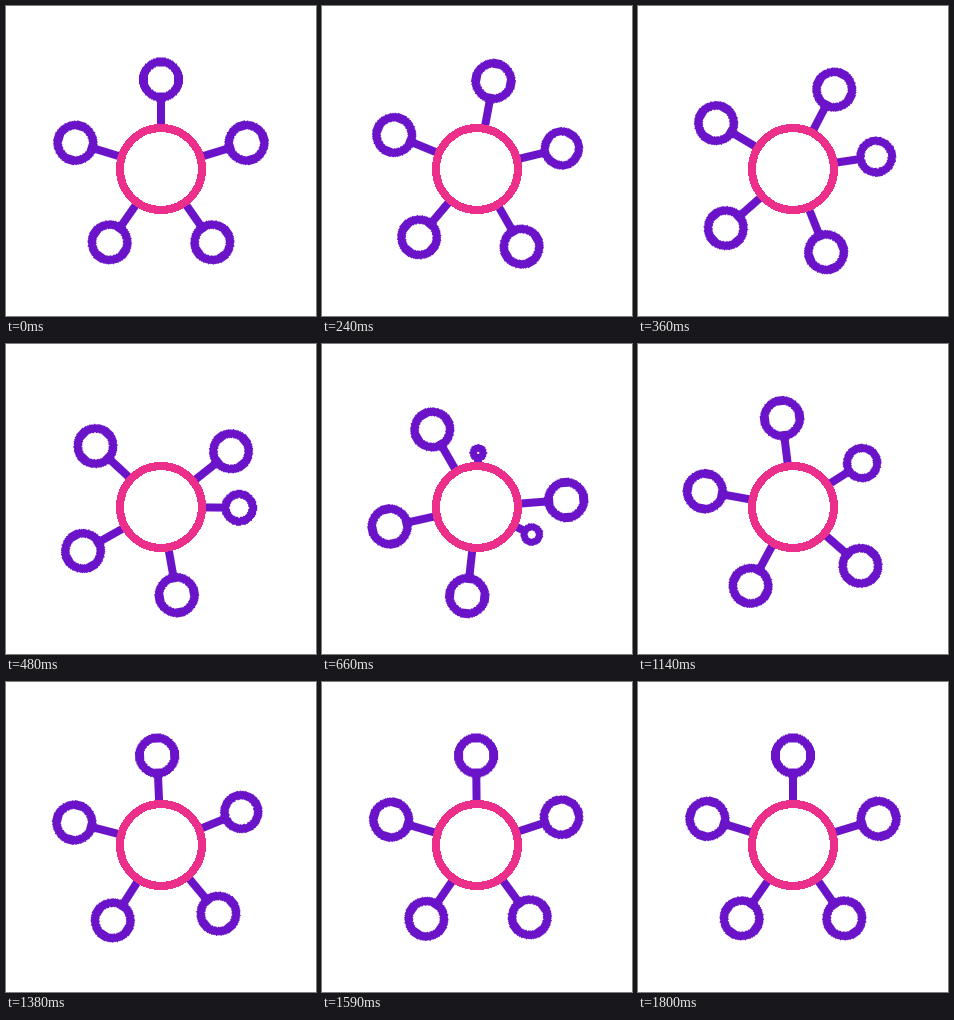
Recreate the animation shown at these times as an HTML page. Size 310x310 px, loop 1.83 s.

```html
<!DOCTYPE html>
<html lang="en">
<head>
<meta charset="utf-8">
<title>Hub and spokes</title>
<style>
  /* 0 = fully extended, 1 = withdrawn behind the hub */
  @property --shrink { syntax: "<number>"; inherits: true; initial-value: 0; }

  html, body { margin: 0; width: 100%; height: 100%; overflow: hidden; background: #fff; }
  svg { display: block; width: 100%; height: 100%; shape-rendering: crispEdges; }

  circle { fill: #fff; }
  .hub { stroke: #ec2f8a; stroke-width: 8px; }

  .node {
    stroke: #6a13c8;
    animation: turn 1830ms cubic-bezier(.333, 0, .2, 1) infinite paused;
  }
  .node line { stroke-width: 8px; }
  .node circle {
    r: max(0px, 17.75px - 21px * var(--shrink));
    stroke-width: calc(8.5px - 2.2px * var(--shrink));
  }

  .leave { animation-name: leave; animation-timing-function: cubic-bezier(.8, 0, .667, 1); }
  .enter { animation-name: enter; }

  @keyframes turn {
    0% { transform: rotate(var(--from)) translateY(-89.5px); }
    98.36%, 100% { transform: rotate(var(--to)) translateY(-89.5px); }
  }
  @keyframes leave {
    0% { --shrink: 0; transform: rotate(73deg) translateY(-89.5px); }
    54.1%, 100% { --shrink: 1; transform: rotate(164deg) translateY(-30.8px); }
  }
  @keyframes enter {
    0%, 11.475% { --shrink: 1; transform: rotate(-46deg) translateY(-30.8px); }
    98.36%, 100% { --shrink: 0; transform: rotate(73deg) translateY(-89.5px); }
  }
</style>
</head>
<body>
<svg viewBox="0 0 310 310">
  <g transform="translate(155 163)">
    <g class="node leave"><line y2="50"/><circle/></g>
    <g class="node enter"><line y2="50"/><circle/></g>
    <g class="node" style="--from:0deg; --to:145deg"><line y2="50"/><circle/></g>
    <g class="node" style="--from:145deg; --to:215deg"><line y2="50"/><circle/></g>
    <g class="node" style="--from:215deg; --to:287deg"><line y2="50"/><circle/></g>
    <g class="node" style="--from:287deg; --to:360deg"><line y2="50"/><circle/></g>
    <circle class="hub" r="41"/>
  </g>
</svg>
<script>
  // Advance the CSS animations in even 30 ms steps.
  const LOOP = 1830, STEP = 30;
  const motions = document.getAnimations();
  const start = performance.now();

  function tick() {
    const time = (performance.now() - start) % LOOP;
    const stepped = Math.floor(time / STEP) * STEP;
    for (const motion of motions) motion.currentTime = stepped;
    requestAnimationFrame(tick);
  }
  tick();
</script>
</body>
</html>
```
